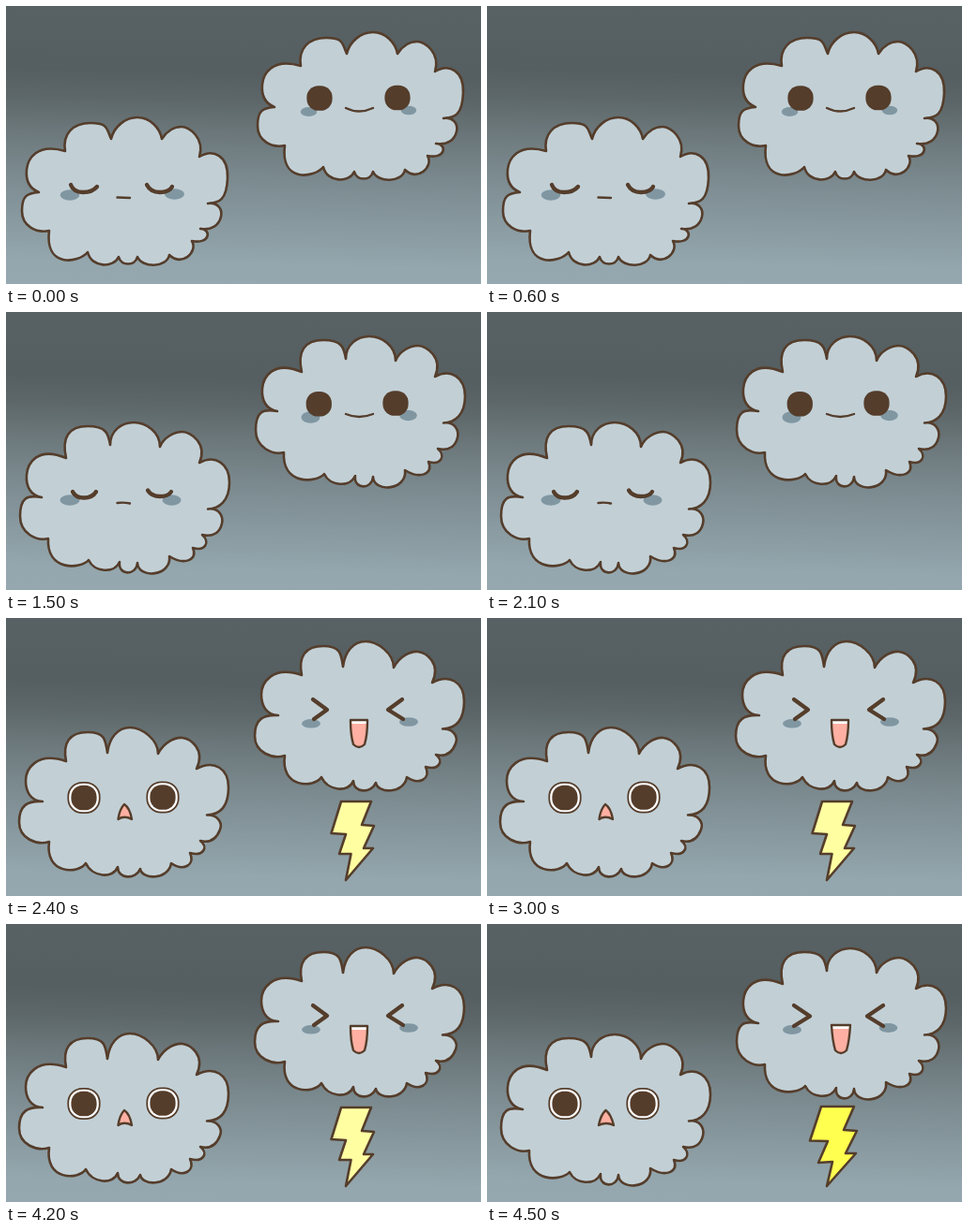
Recreate the animation shown at these times as an HTML page without scripts. Size 506 by 297 pixels, loop 4.8 s.

```html
<!DOCTYPE html>
<html lang="en">
<head>
<meta charset="utf-8">
<title>Two clouds</title>
<style>
  html, body { margin: 0; width: 100%; height: 100%; overflow: hidden; background: #566062; }
  svg { display: block; width: 100%; height: 100%; }

  .cloud { fill: #c2d0d6; stroke: #553d2b; stroke-width: 2.6; stroke-linejoin: round; }
  .line { fill: none; stroke: #553d2b; stroke-width: 2.4; stroke-linecap: round; stroke-linejoin: round; }
  .thick { stroke-width: 4.3; }
  .blush { fill: #8097a2; }
  .eye { fill: #553d2b; }
  .white { fill: #fff; stroke: #553d2b; stroke-width: 1.8; }
  .pink { fill: #ffb0a2; }
  .teeth { fill: #fff; }
  .bolt { stroke: #553d2b; stroke-width: 2.6; stroke-linejoin: round; }

  /* mood lasts half the loop, the wobble swaps drawings every 300 ms */
  .calm { animation: first 4.8s step-end infinite; }
  .storm { animation: second 4.8s step-end infinite; }
  .even { animation: first .6s step-end infinite; }
  .odd { animation: second .6s step-end infinite; }
  @keyframes first { 0% { opacity: 1 } 50%, 100% { opacity: 0 } }
  @keyframes second { 0% { opacity: 0 } 50%, 100% { opacity: 1 } }
</style>
</head>
<body>
<svg viewBox="0 0 506 297" preserveAspectRatio="none">
  <defs>
    <linearGradient id="sky" gradientUnits="userSpaceOnUse" x1="253" y1="0" x2="246" y2="297">
      <stop offset="0" stop-color="#586264"/>
      <stop offset=".24" stop-color="#555e60"/>
      <stop offset=".34" stop-color="#5d6769"/>
      <stop offset=".46" stop-color="#6b777a"/>
      <stop offset=".6" stop-color="#79888d"/>
      <stop offset=".78" stop-color="#88999f"/>
      <stop offset=".93" stop-color="#94a7ae"/>
      <stop offset="1" stop-color="#95a8af"/>
    </linearGradient>

    <path id="puffA" d="M286 108 C276 104 272 95 273 84 S283 55 314 64
      C311 46 322 34 341 34 S358 40 363 51
      C366 38 378 28 391 28 S415 39 417 51
      C422 43 430 38 438 38 S463 50 457 70
      C472 61 488 69 487 93 S478 119 466 120
      C475 118 482 125 480 134 S470 149 458 147
      C470 147 469 164 449 160
      C456 172 438 188 425 175
      C422 189 396 189 391 177
      C388 187 374 187 371 177
      C366 189 342 189 338 172
      C328 184 292 189 297 149
      C283 152 268 144 268 128 S273 109 286 108Z"/>
    <path id="puffB" d="M289 106 C277 104 272 94 273 82 S284 51 315 64
      C310 42 318 30 338 30 S360 38 362 50
      C362 35 374 26 387 26 S415 36 415 52
      C419 42 430 36 439 36 S466 49 457 69
      C474 60 489 70 489 90 S478 118 466 118.5
      C477 117 483 125 481 134 S472 149 460 146
      C469 154 463 164 450 160
      C456 173 441 179 425 169
      C428 190 392 194 391 176
      C390 190 370 190 372 175
      C366 188 345 186 339 173
      C330 183 294 185 296 150
      C284 153 266 145 266 126 S273 103 289 106Z"/>
    <path id="puffC" d="M290 104 C278 104 272 94 272 82 S283 50 315 61
      C311 41 319 30 338 30 S357 39 359 52
      C361 36 370 25 383 25 S413 38 413 53
      C419 41 431 35 439 36 S464 48 454 69
      C473 59 488 69 488 89 S479 118 465 118.5
      C476 118 482 126 479 134 S470 149 458 146
      C467 153 461 163 447 159
      C453 172 440 179 427 170
      C424 188 396 188 394 176
      C389 188 370 187 370 174
      C365 187 343 185 336 170
      C328 182 292 182 297 147
      C284 151 265 144 265 126 S274 103 290 104Z"/>

    <g id="pairA" class="cloud"><use href="#puffA"/><use href="#puffA" x="-251" y="91"/></g>
    <g id="pairB" class="cloud"><use href="#puffB"/><use href="#puffB" x="-251" y="92"/></g>
    <g id="pairC" class="cloud"><use href="#puffC"/><use href="#puffC" x="-251" y="92"/></g>

    <rect id="pupil" class="eye" x="-13.6" y="-13.3" width="27.2" height="26.6" rx="12.3"/>
    <g id="stare">
      <rect class="white" x="-16.7" y="-16.2" width="33.4" height="32.4" rx="15"/>
      <use href="#pupil"/>
    </g>
  </defs>

  <rect width="506" height="297" fill="url(#sky)"/>

  <g class="calm">
    <g class="even">
      <use href="#pairA"/>
      <g class="blush">
        <ellipse cx="322.5" cy="113" rx="8.7" ry="5"/><ellipse cx="429" cy="111.5" rx="8.2" ry="4.8"/>
        <ellipse cx="68" cy="202" rx="10.3" ry="5.8"/><ellipse cx="179.5" cy="201" rx="10.5" ry="5.8"/>
      </g>
      <use href="#pupil" x="334" y="98.5"/><use href="#pupil" x="417" y="98"/>
      <path class="line" d="M362 109Q376 116 391 109M118.5 204.5L132 205"/>
      <path class="line thick" d="M69 191Q72 199 82 199T97 193M150 191Q154 199 164 199T177 193"/>
    </g>
    <g class="odd">
      <use href="#pairB"/>
      <g class="blush">
        <ellipse cx="324.5" cy="112.5" rx="10" ry="6.2"/><ellipse cx="428.5" cy="110.5" rx="9.3" ry="5.8"/>
        <ellipse cx="68" cy="201" rx="10.5" ry="5.8"/><ellipse cx="176.5" cy="201" rx="10" ry="5.8"/>
      </g>
      <use href="#pupil" x="333.3" y="98.3"/><use href="#pupil" x="415" y="97.5"/>
      <path class="line" d="M362 109Q376 115 391 109M118.5 204Q125 203 132 204.5"/>
      <path class="line thick" d="M71 192Q74 198.500 83 198.500T96 192M151 190.500Q155 197 164 197T176 192"/>
    </g>
  </g>

  <g class="storm">
    <g class="even">
      <use href="#pairC"/>
      <g class="blush">
        <ellipse cx="325" cy="112.8" rx="10" ry="4.8"/><ellipse cx="429" cy="111" rx="10" ry="4.8"/>
      </g>
      <path class="line thick" d="M327 87L342 98L328 108M422 87L407 98L423 108"/>
      <path class="pink" d="M367 109H385Q385 125 382 135Q376 141 370 135Q367 125 367 109Z"/>
      <path class="teeth" d="M367 109H385V113H367Z"/>
      <path class="line" d="M367 109H385Q385 125 382 135Q376 141 370 135Q367 125 367 109Z"/>
      <use href="#stare" x="83" y="192"/><use href="#stare" x="167" y="191.5"/>
      <path class="line" style="fill:#ffb0a2" d="M126 199Q121 204 119.5 215Q126 210.5 134 215Q132 203 126 199Z"/>
      <path class="bolt" fill="#ffffa2" d="M357 196H389L379 221L392 222L381 246H391L362 280L367.5 252H355L362 231L346.5 230Z"/>
    </g>
    <g class="odd">
      <use href="#pairB"/>
      <g class="blush">
        <ellipse cx="325" cy="113" rx="10" ry="5"/><ellipse cx="427.5" cy="111" rx="9.8" ry="5"/>
      </g>
      <path class="line thick" d="M327 87L344 98.5L327 109M422 87L405 98.5L422 109"/>
      <path class="pink" d="M367 108H387Q386 125 383 135Q377 141 371 135Q368 125 367 108Z"/>
      <path class="teeth" d="M367 108H387L386.5 112H367.5Z"/>
      <path class="line" d="M367 108H387Q386 125 383 135Q377 141 371 135Q368 125 367 108Z"/>
      <use href="#stare" x="83" y="192"/><use href="#stare" x="166" y="192"/>
      <path class="line" style="fill:#ffb0a2" d="M126.5 199Q121 204 119 215Q127 211 135 215Q132 203 126.5 199Z"/>
      <path class="bolt" fill="#ffff4f" d="M356 195H391L380 220L394 221L382 245H393L362 280L368 254L353 255L363 232L344 231.5Z"/>
    </g>
  </g>
</svg>
</body>
</html>
```
